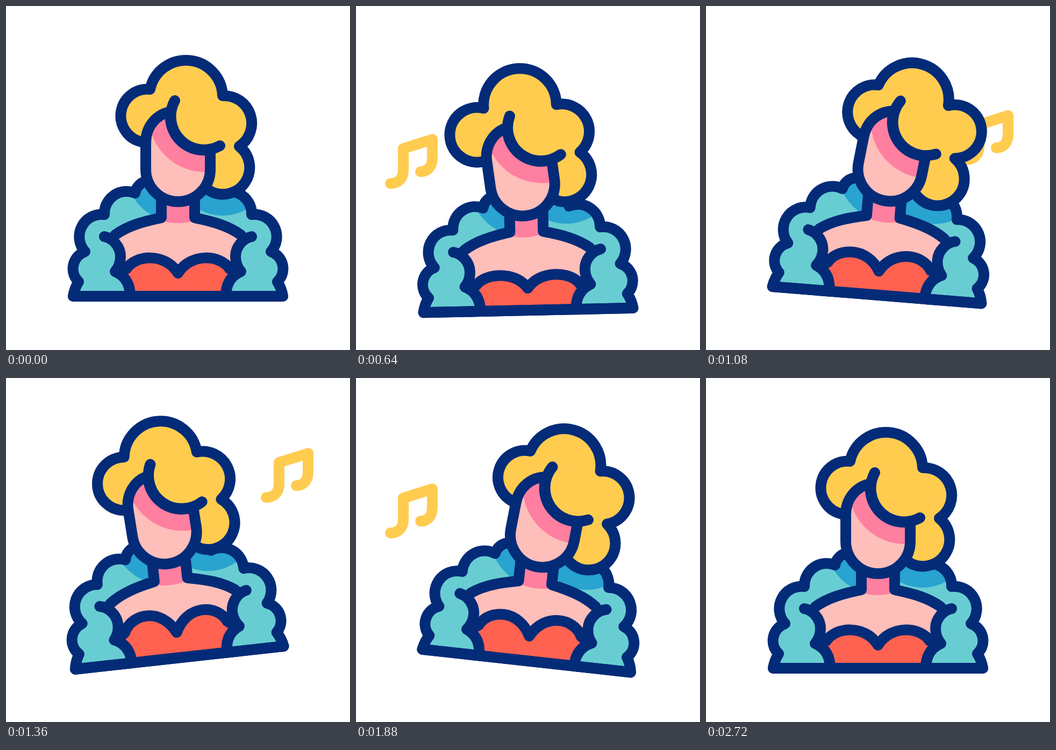
Animation of 640 by 640 pixels, one loop 2.84 s. Source, as an HTML page:

```html
<!DOCTYPE html>
<html lang="en">
<head>
<meta charset="utf-8">
<title>Singer</title>
<style>
  html, body { margin: 0; width: 100%; height: 100%; overflow: hidden; background: #fff; }
  svg { display: block; width: 100%; height: 100%; }
  .line { fill: none; stroke: #042b78; stroke-width: 20; stroke-linecap: round; stroke-linejoin: round; }
  .note { fill: none; stroke: #ffcc50; stroke-width: 20; stroke-linecap: round; stroke-linejoin: round; }
</style>
</head>
<body>
<svg viewBox="0 0 640 640">
  <defs>
    <path id="tune" d="M484 222C500 222 508 211 508 197V157L562 140V174C562 190 554 200 540 200"/>
    <path id="fur"/>
    <path id="furLine" class="line"/>
    <path id="chest" d="M289 340H351V394L445 424V540H195V424L289 394Z"/>
    <path id="face" d="M305 197C279 202 260 225 260 254V304A60 60 0 0 0 380 304V267A62 62 0 0 1 306 203Z"/>
    <clipPath id="furLeft"><use href="#fur"/></clipPath>
    <clipPath id="furRight"><use href="#fur" transform="translate(640) scale(-1 1)"/></clipPath>
    <clipPath id="chestClip"><use href="#chest"/></clipPath>
    <clipPath id="faceClip"><use href="#face"/></clipPath>
  </defs>
  <rect width="640" height="640" fill="#fff"/>
  <use id="noteRight" href="#tune" class="note"/>
  <use id="noteLeft" href="#tune" class="note"/>
  <g id="body">
    <use href="#chest" fill="#febeb9"/>
    <g clip-path="url(#chestClip)"><circle class="shade" cx="320" cy="304" r="100" fill="#fe7fa0"/></g>
    <path id="dress" class="line" style="fill:#ff6250"/>
    <use href="#fur" fill="#68cdd2"/>
    <use href="#fur" fill="#68cdd2" transform="translate(640) scale(-1 1)"/>
    <g clip-path="url(#furLeft)"><circle class="shade" cx="320" cy="304" r="98" fill="#29a3cf"/></g>
    <g clip-path="url(#furRight)"><circle class="shade" cx="403" cy="299" r="91" fill="#29a3cf"/></g>
    <use href="#furLine"/>
    <use href="#furLine" transform="translate(640) scale(-1 1)"/>
    <path class="line" d="M125 540H515"/>
    <g id="head">
      <path id="hair" class="line" style="fill:#ffcc50"/>
      <use href="#face" fill="#febeb9"/>
      <g clip-path="url(#faceClip)"><circle cx="371" cy="203" r="106" fill="#fe7fa0"/></g>
      <use href="#face" class="line"/>
      <path class="line" d="M314 176A62 62 0 0 0 398 260"/>
    </g>
  </g>
</svg>
<script>
const FRAME = 40, LOOP = 2840, LAST = 68;
const $ = id => document.getElementById(id);
const shades = document.querySelectorAll('.shade');

// Keys are [frame, value], eased with a half cosine between neighbours.
const SWAY = [[0, 0], [10, -7.6], [23.3, 7.4], [36.3, -7.4], [49.3, 7.4], [68, 0]];
const NOD = [[5, 0], [15, -7], [27.3, 6.7], [38, -7], [50, 6.7], [67, 0]];
const BOB = [[3, 0], [14, 27], [37, -21.5], [40, -21.5], [57, 0]];
const PUFF = [[3, 0], [15, -1], [27, 1], [39.5, -1], [50.5, 1], [64, 0]];
const HEAVE = [[3, 0], [14, -5], [40, 13], [57, 0]];

function ease(keys, f) {
  if (f <= keys[0][0]) return keys[0][1];
  for (let i = 1; i < keys.length; i++) {
    const [f0, v0] = keys[i - 1], [f1, v1] = keys[i];
    if (f <= f1) return v0 + (v1 - v0) * (1 - Math.cos(Math.PI * (f - f0) / (f1 - f0))) / 2;
  }
  return keys[keys.length - 1][1];
}

// Chain of clockwise arcs through [x, y, bulge] points.
function lobes(x, y, points) {
  let d = `M${x} ${y}`;
  for (const [px, py, bulge] of points) {
    const half = Math.hypot(px - x, py - y) / 2;
    const r = (half * half + bulge * bulge) / (2 * bulge);
    d += `A${r} ${r} 0 ${bulge > half ? 1 : 0} 1 ${px} ${py}`;
    x = px;
    y = py;
  }
  return d;
}

const scallops = lobes(135, 513, [[147, 457, 16], [183, 388, 27], [240, 348, 19], [262, 326, 5]]);
const shoulder = 'V394C255 401 226 409 203 426';
const sleeve = '183 429C199 432 213 448 213 466C213 478 209 487 203 494' +
  'C222 502 231 518 231 540H125Q127 526 135 513';
$('fur').setAttribute('d', `${scallops}L289 340${shoulder}L${sleeve}Z`);
$('furLine').setAttribute('d', `${scallops}M289 350${shoulder}M${sleeve}`);

function hair(puff) {
  const left = Math.max(0, -puff), right = Math.max(0, puff);
  return lobes(253, 253, [
    [268, 155, 47 + 16 * left - 7 * right],
    [403, 167, 60 + 11 * left],
    [434, 261, 38 + 18 * right],
    [381, 345, 45 + 8 * right - 4 * left]
  ]) + 'L320 300Z';
}

// The cups rise more than the dip between them.
function dress(heave) {
  const rim = 489 - heave * 0.6, cup = 463 - heave * 1.4, peak = 458 - heave * 1.4, dip = 497 - heave * 0.4;
  return `M208 495L224 ${rim}C240 ${cup} 296 ${peak} 320 ${dip}` +
    `C344 ${peak} 400 ${cup} 416 ${rim}L432 495V540H208Z`;
}

// A note rises for 12 frames, fading briefly at both ends.
function showNote(node, f, starts, x, y) {
  const age = f - (starts.filter(s => s <= f).pop() ?? -99);
  const alpha = Math.max(0, Math.min(1, age, 12 - age));
  node.setAttribute('opacity', alpha);
  node.setAttribute('transform', `translate(${x} ${y - 9.1 * age})`);
}

function draw(ms) {
  const f = Math.min(LAST, Math.floor((ms % LOOP) / FRAME));
  const nod = `rotate(${ease(NOD, f)} 320 352)`;
  $('body').setAttribute('transform', `translate(0 ${ease(BOB, f)}) rotate(${ease(SWAY, f)} 320 515)`);
  $('head').setAttribute('transform', nod);
  shades.forEach(s => s.setAttribute('transform', nod));
  $('hair').setAttribute('d', hair(ease(PUFF, f)));
  $('dress').setAttribute('d', dress(ease(HEAVE, f)));
  showNote($('noteRight'), f, [0, 26], 0, 73);
  showNote($('noteLeft'), f, [13, 39.4], -420, 135.5);
}

let start;
function tick(now) {
  start ??= now;
  draw(now - start);
  requestAnimationFrame(tick);
}
draw(0);
requestAnimationFrame(tick);
</script>
</body>
</html>
```
